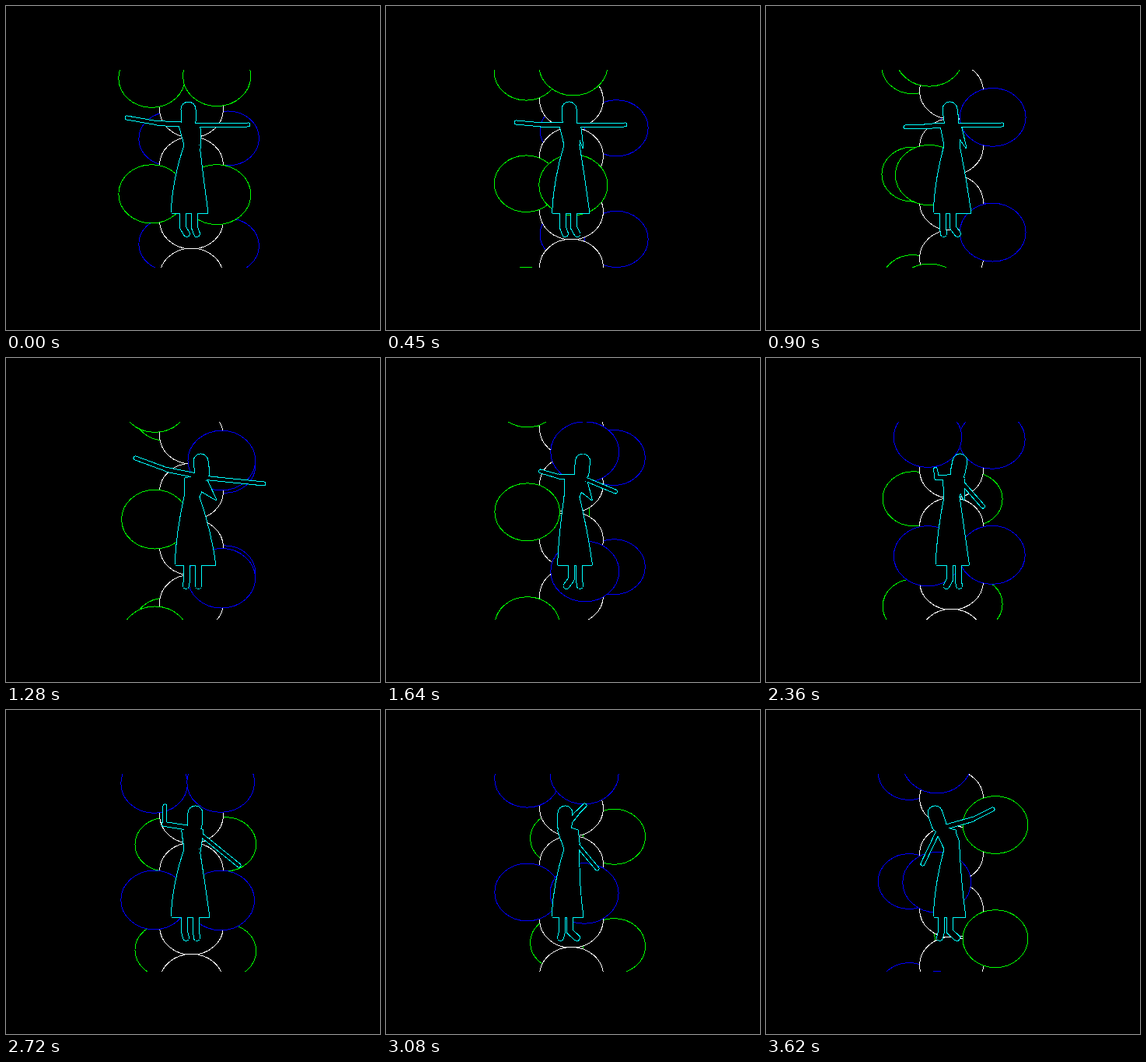
Animation of 481 by 416 pixels, one loop 3710 ms. Source, as an HTML page:

```html
<!DOCTYPE html>
<html lang="en">
<head>
<meta charset="utf-8">
<title>Dancer in a helix of spheres</title>
<style>
  html, body { margin: 0; width: 100%; height: 100%; overflow: hidden; background: #000; }
  svg { display: block; width: 481px; height: 416px; }
</style>
</head>
<body>
<svg viewBox="0 0 481 416" shape-rendering="crispEdges">
  <clipPath id="band"><rect x="100" y="81.5" width="280" height="254"/></clipPath>
  <g transform="translate(.5 .5)">
    <g id="spheres" clip-path="url(#band)"></g>
    <g id="dancer" stroke-linecap="round" stroke-linejoin="round"></g>
  </g>
</svg>
<script>
const LOOP = 3710;
const AXIS = 238, HORIZON = 206, DEPTH = 825;
const RX = 41, RY = 36.2, PITCH = 143;
const RAD = Math.PI / 180;

// Key poses: x of head, nape, hem, legs and sleeve; toe offsets;
// one arm bends at an elbow, the other reaches straight out.
const poses = [
  { step: 0, head: 234, nape: 234, hem: [212, 259], legs: [227, 242], toes: [5, 3], sleeve: 249,
    elbow: [195, 150], hand: [155, 143], reach: [311, 152] },
  { step: 10, head: 236, nape: 238, hem: [215, 263], legs: [227, 240], toes: [1, 6], sleeve: 257,
    elbow: [205, 154], hand: [179, 155], reach: [303, 152] },
  { step: 14, head: 250, nape: 252, hem: [217, 269], legs: [232, 247], toes: [-1, 0], sleeve: 270,
    elbow: [207, 143], hand: [166, 128], reach: [331, 161] },
  { step: 22, head: 255, nape: 250, hem: [224, 260], legs: [243, 249], toes: [-11, 2], sleeve: 259,
    elbow: [235, 160], hand: [231, 162], reach: [258, 181] },
  { step: 30, head: 243, nape: 242, hem: [212, 261], legs: [229, 244], toes: [2, 1], sleeve: 249,
    elbow: [203, 146], hand: [204, 123], reach: [299, 199] },
  { step: 34, head: 230, nape: 229, hem: [213, 253], legs: [226, 236], toes: [-2, 9], sleeve: 249,
    elbow: [245, 132], hand: [255, 122], reach: [271, 203] },
  { step: 40, head: 217, nape: 222, hem: [215, 256], legs: [225, 236], toes: [-2, 9], sleeve: 247,
    elbow: [265, 140], hand: [291, 127], reach: [201, 197] }
];

const spheres = document.getElementById('spheres');
const dancer = document.getElementById('dancer');

// A screw motion: the helix turns, slowing very slightly, and rises in proportion.
function drawSpheres(step) {
  const turned = 6 * step - 0.0065 * step * step;
  const level = 239.5 - turned * PITCH / 360;
  const balls = [];
  const addPair = (color, y, angle) => {
    for (const side of [-45, 45]) {
      const a = (angle + side) * RAD, r = RX * Math.SQRT2;
      balls.push({ color, x: r * Math.sin(a), y, z: r * Math.cos(a) });
    }
  };
  for (let k = -2; k <= 2; k++) {
    const y = level + k * PITCH;
    addPair('#0f0', y, -13 - turned);
    addPair('#00f', y + PITCH / 2, 167 - turned);
    for (const q of [1, 3]) balls.push({ color: '#fff', x: 0, y: y + q * PITCH / 4, z: 0 });
  }
  balls.sort((a, b) => a.z - b.z);
  spheres.innerHTML = balls.map(({ color, x, y, z }) => {
    const s = 1 / (1 - z / DEPTH);
    return `<ellipse cx="${AXIS + x * s}" cy="${HORIZON + (y - HORIZON) * s}"
      rx="${RX * s}" ry="${RY * s}" fill="#000" stroke="${color}"/>`;
  }).join('');
}

const mix = (a, b, f) => Array.isArray(a) ? a.map((v, i) => mix(v, b[i], f)) : a + (b - a) * f;

function poseAt(step) {
  const i = Math.max(1, poses.findIndex(p => p.step >= step));
  const from = poses[i - 1], to = poses[i];
  const f = (step - from.step) / (to.step - from.step);
  return Object.fromEntries(Object.keys(from).map(key => [key, mix(from[key], to[key], f)]));
}

function drawDancer(step) {
  const { head, nape, hem: [hemL, hemR], legs, toes, sleeve, elbow, hand, reach } = poseAt(step);
  const lean = nape - AXIS;
  const shoulderL = 224 + 0.4 * lean, shoulderR = 251 + 0.5 * lean;
  const solids = [
    `M${shoulderL} 154 L${nape} 148 L${shoulderR} 154 L248 178 Q${hemR - 6} 222 ${hemR} 265
      H${hemL} Q${hemL + 2} 222 229 178 Z`,
    `M${shoulderR} 156 L${sleeve} 182 L248 169 Z`
  ];
  const limbs = [
    [`M${head} 132 L${nape} 147`, 18],
    [`M${nape} 152 L${elbow}`, 5],
    [`M${elbow} L${hand}`, 4],
    [`M${nape} 153 L${reach}`, 4],
    ...legs.map((x, i) => [`M${x} 262 V284 L${x + toes[i]} 292`, 7])
  ];
  // A wide cyan layer under a narrower black one leaves the outline of the union.
  const layer = (color, edge) =>
    solids.map(d => `<path d="${d}" fill="${color}" stroke="${color}" stroke-width="${edge}"/>`).join('') +
    limbs.map(([d, w]) => `<path d="${d}" fill="none" stroke="${color}" stroke-width="${w + edge}"/>`).join('');
  dancer.innerHTML = layer('#0ff', 2) + layer('#000', 0);
}

let shown = -1;
function frame(now) {
  const t = now % LOOP;
  const step = Math.floor((t < 1170 ? t : t - 20) / 90);
  if (step !== shown) {
    shown = step;
    drawSpheres(step);
    drawDancer(step);
  }
  requestAnimationFrame(frame);
}
frame(0);
</script>
</body>
</html>
```
